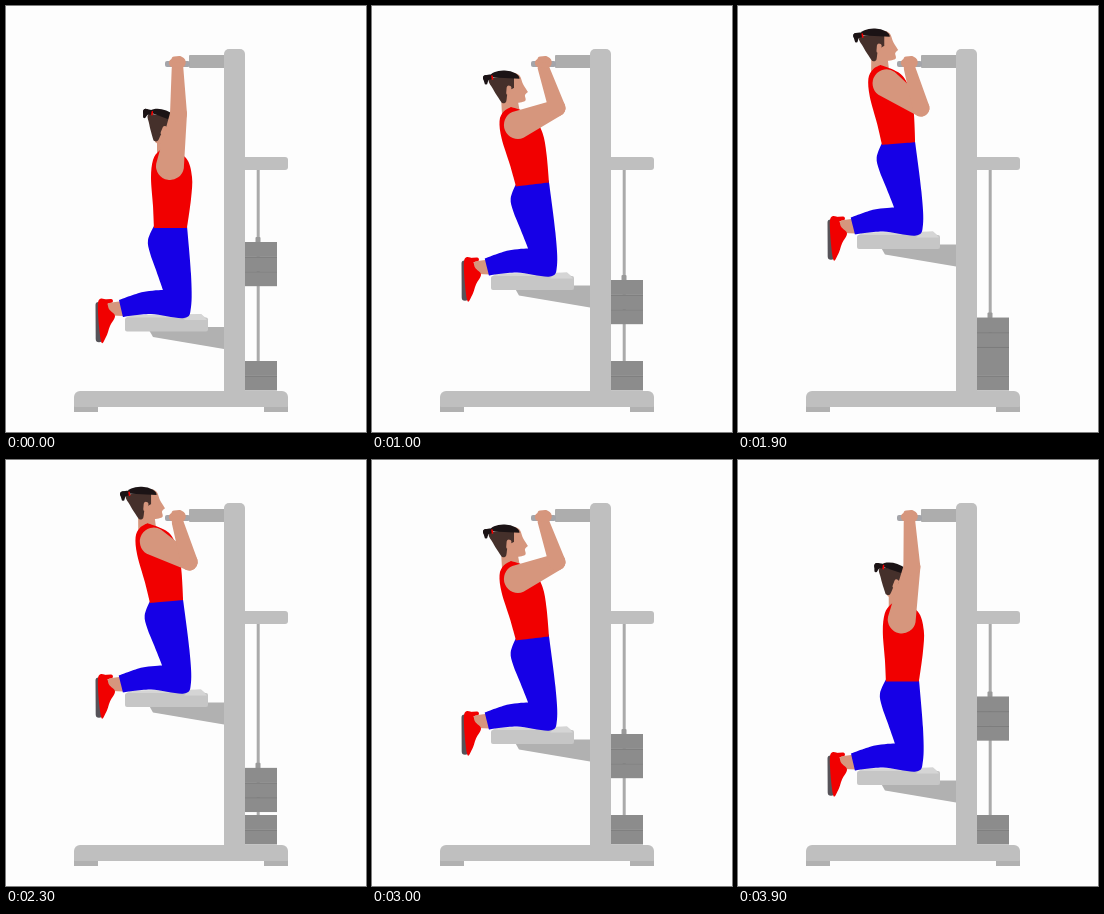
Animation, 360 px wide and 426 px high, one loop 4000 ms. Source, as an HTML page with a canvas:

```html
<!DOCTYPE html>
<html lang="en">
<head>
<meta charset="utf-8">
<title>Assisted pull-up</title>
<style>
html, body { margin: 0; width: 100%; height: 100%; overflow: hidden; background: #fdfdfd; }
canvas { display: block; }
</style>
</head>
<body>
<canvas id="stage" width="360" height="426"></canvas>
<script>
const c = document.getElementById('stage').getContext('2d');
const LOOP = 4000, STEP = 100, LIFT = 83, DROP = 76, WAIST = 221, TORSO = 78;
const SKIN = '#d6967d', RED = '#f10000', BLUE = '#1600e6', HAIR = '#45302b', BLACK = '#1b1315';
const STEEL = '#bfbfbf', SHADE = '#b1b1b1', LIGHT = '#d5d5d5', IRON = '#8c8c8c';

const lerp = (a, b, k) => a + (b - a) * k;
const clamp = (v, lo, hi) => Math.max(lo, Math.min(hi, v));

// "x,y x,y ..." to points; a trailing ! marks a sharp corner
const points = text => text.split(' ').map(s => [...s.replace('!', '').split(',').map(Number), s.endsWith('!')]);

function rect(color, x, y, w, h, r = 0) {
  c.fillStyle = color;
  c.beginPath();
  c.roundRect(x, y, w, h, r);
  c.fill();
}

// Closed spline through all points
function blob(color, p) {
  const at = i => p[(i + p.length) % p.length];
  const handle = (i, axis, side) => at(i)[axis] +
    (at(i)[2] ? 0 : side * (at(i + 1)[axis] - at(i - 1)[axis]) / 6);
  c.fillStyle = color;
  c.beginPath();
  c.moveTo(p[0][0], p[0][1]);
  p.forEach((_, i) => c.bezierCurveTo(handle(i, 0, 1), handle(i, 1, 1),
    handle(i + 1, 0, -1), handle(i + 1, 1, -1), at(i + 1)[0], at(i + 1)[1]));
  c.fill();
}

function polygon(color, p) {
  c.fillStyle = color;
  c.beginPath();
  p.forEach(([x, y]) => c.lineTo(x, y));
  c.fill();
}

// Tapered limb between two round joints
function limb(color, [ax, ay], ra, [bx, by], rb) {
  const angle = Math.atan2(by - ay, bx - ax), quarter = Math.PI / 2;
  c.fillStyle = color;
  c.beginPath();
  c.arc(ax, ay, ra, angle + quarter, angle - quarter);
  c.arc(bx, by, rb, angle - quarter, angle + quarter);
  c.fill();
}

// Run a drawing in its own moved and turned frame
function at(x, y, angle, paint) {
  c.save();
  c.translate(x, y);
  c.rotate(angle);
  paint();
  c.restore();
}

const torso = points('153,145 147,154 145,172 147,200 148,222! 181,222! 185,193 186,171 180,152 161,141!');
const legs = points('148,220! 142,234 144,247 150,264 157,284! 137,286 113,294! 117,311! 145,308 178,312 185,301 185,268 181,220!');
const shoe = points('92,297 100,294 103,303 109,310 104,320 100,331 95,335');
const face = points('4,-13 13,-13 17,-4 22,4! 19,7 19,13 8,15 -3,14');
const hair = points('-16,-9 -13,1 -4,15! 0,14 2,4 8,0! 8,-12!');

function weight(y, plates) {
  for (let i = 0; i < plates; i++) {
    rect(IRON, 239, y + i * 14.7, 32, 14.8);
    if (i) rect('#7b7b7b', 239, y + i * 14.7, 32, 1);
  }
}

function machine(p) {
  const y = 236 + DROP * p;
  rect('#aaaaaa', 250.7, 164, 3, 192);
  rect('#999999', 249.5, y - 5, 5, 6, 1);
  weight(y, 3);
  weight(355, 2);
  rect('#adadad', 183, 49, 36, 13, 1);
  rect('#a4a5aa', 159, 55, 25, 6, 2);
  rect(STEEL, 236, 151, 46, 13, 3);
  for (const x of [68, 258]) rect(SHADE, x, 399, 24, 7);
  rect(STEEL, 68, 385, 214, 16, [6, 6, 1, 1]);
  rect(STEEL, 218, 43, 21, 344, [5, 5, 0, 0]);
}

function seat() {
  polygon(SHADE, points('143,324 202,321 218,321 218,343 147,331'));
  polygon(LIGHT, points('120,312 124,309 195,308 201,313'));
  rect('#c6c6c6', 119, 311.5, 83, 14, 2);
  polygon(LIGHT, points('178,314 183,309 195,308 201,314'));
}

function feet() {
  limb(RED, [97, 296], 2.5, [105, 295], 2);
  limb(SKIN, [117, 302.5], 7.5, [106, 303], 6.5);
  limb('#565359', [92.5, 299], 3, [93, 333], 3.3);
  blob(RED, shoe);
}

function head() {
  blob(SKIN, face);
  blob(HAIR, hair);
  c.fillStyle = BLACK;
  c.beginPath();
  c.ellipse(-1.5, -10, 15, 7.5, 0.05, Math.PI, 0);
  c.fill();
  limb(BLACK, [-16, -11], 2.5, [-20, -10], 3);
  limb(BLACK, [-20, -10], 3, [-20, -5], 1.5);
  limb(RED, [-14, -12], 0.8, [-13.5, -9], 0.8);
  limb(SKIN, [3, 0], 2.4, [2, 5], 1.8);
}

function draw(time) {
  const t = Math.floor(time % LOOP / STEP) * STEP;
  const p = (1 - Math.cos(2 * Math.PI * t / LOOP)) / 2;
  const lean = Math.min(1, 2 * p), bend = Math.sqrt(lean);
  const tilt = Math.max(0, p - 0.82) / 4;
  const rise = LIFT * p;

  // Shear the body backwards, most at the neck and not at all at the knees
  const flex = ([x, y, corner]) => {
    const h = clamp((WAIST - y) / TORSO, -1, 1);
    const dx = h > 0 ? -4 - 18 * h : -4 * (1 + h);
    const dy = h > -0.1 ? 3 * h - 0.12 * (x - 148) : 0;
    return [x + dx * lean, y + dy * lean, corner];
  };
  // Upper body also tips forward near the top
  const upper = point => {
    const [x, y, corner] = flex(point), dx = x - 160, dy = y - WAIST;
    return [160 + dx * Math.cos(tilt) - dy * Math.sin(tilt),
      WAIST + dx * Math.sin(tilt) + dy * Math.cos(tilt) - rise, corner];
  };

  rect('#fdfdfd', 0, 0, 360, 426);
  at(0, -rise, 0, seat);
  machine(p);
  at(0, -rise, 0, () => {
    feet();
    blob(BLUE, legs.map(flex));
  });

  const [x, y] = upper([156, 121.5]);
  limb(SKIN, [x + 3, y + 9], 8, upper([160, 147]), 9);
  at(x, y, lerp(0.31, 0, bend), head);
  blob(RED, torso.map(upper));

  const elbow = [lerp(172.5, 185, bend) - 4 * Math.max(0, p - 0.5), lerp(108, 102, bend)];
  limb(SKIN, upper([164, 160]), 14, elbow, 8.5);
  limb(SKIN, elbow, 8.5, [171.5, 62], 5.8);
  limb(SKIN, [167, 57], 4.2, [174, 56.5], 5.8);
  limb(SKIN, [168.5, 53.5], 3, [173.5, 53], 3);
}

function tick() {
  draw(performance.now());
  requestAnimationFrame(tick);
}
tick();
</script>
</body>
</html>
```
